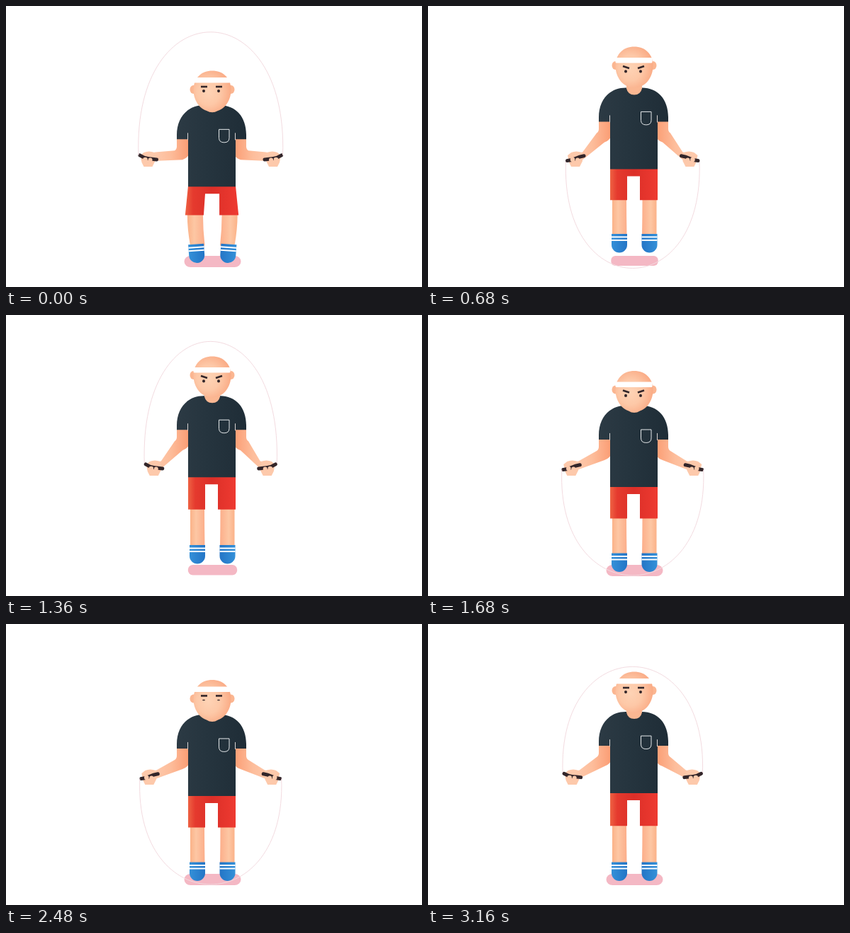
Animation of 587 by 397 pixels, one loop 3.2 s. Source, as an HTML page:

```html
<!DOCTYPE html>
<html lang="en">
<head>
<meta charset="utf-8">
<title>Skipping rope</title>
<style>
  html, body { margin: 0; width: 100%; height: 100%; overflow: hidden; background: #fff; }
  svg { display: block; }
</style>
</head>
<body>
<svg width="587" height="397" viewBox="0 0 587 397">
  <defs>
    <radialGradient id="face" cx=".4" cy=".52" r=".62">
      <stop offset="0" stop-color="#fed3b5"/><stop offset=".5" stop-color="#fdc8a7"/>
      <stop offset="1" stop-color="#faa983"/>
    </radialGradient>
    <linearGradient id="arm" gradientUnits="userSpaceOnUse" x1="200" y1="0" x2="258" y2="0">
      <stop offset="0" stop-color="#fecfb4"/><stop offset=".55" stop-color="#fdbd9b"/>
      <stop offset="1" stop-color="#fb9d74"/>
    </linearGradient>
    <linearGradient id="leg">
      <stop offset="0" stop-color="#fbb288"/><stop offset=".4" stop-color="#fdc7a4"/>
      <stop offset="1" stop-color="#fcae8a"/>
    </linearGradient>
    <linearGradient id="shirt">
      <stop offset="0" stop-color="#2c3a44"/><stop offset=".4" stop-color="#26353f"/>
      <stop offset="1" stop-color="#1f2d37"/>
    </linearGradient>
    <linearGradient id="shorts">
      <stop offset="0" stop-color="#ee6243"/><stop offset=".15" stop-color="#e53a2e"/>
      <stop offset=".5" stop-color="#dc2f28"/><stop offset="1" stop-color="#ee3a31"/>
    </linearGradient>
    <linearGradient id="sock">
      <stop offset="0" stop-color="#3490d8"/><stop offset="1" stop-color="#2475c6"/>
    </linearGradient>
  </defs>
  <g id="scene"></g>
</svg>
<script>
const LOOP = 3200, STEP = 40, TURN = Math.PI * 2;
const DARK = '#33262a', SKIN = '#fdc9ab', GROUND = 363;
const scene = document.getElementById('scene');

// One jump, ten evenly spaced poses
const HIP = [255, 253, 243, 235, 230, 228, 228, 230, 233, 238];
const CROWN = [91, 89, 79, 69, 60, 55, 54, 57, 60, 66];
const LIFT = [0, 0, 0, 3, 10, 15, 17, 15.5, 8, 0];

function sample(keys, p) {
  const i = Math.floor(p), u = p - i, n = keys.length;
  const [a, b, c, d] = [-1, 0, 1, 2].map(k => keys[(i + k + n) % n]);
  return b + u / 2 * (c - a + u * (2 * a - 5 * b + 4 * c - d + u * (3 * (b - c) + d - a)));
}
const clamp = x => Math.max(0, Math.min(1, x));
const smooth = (t, from, to) => { const x = clamp((t - from) / (to - from)); return x * x * (3 - 2 * x); };
const blinkAt = (t, mid) => clamp(1.5 - Math.abs(t - mid) / 70);
const line = (x1, y1, x2, y2, color, w) =>
  `<path d="M${x1} ${y1}L${x2} ${y2}" stroke="${color}" stroke-width="${w}" fill="none"/>`;

function shadow(lift) {
  const air = clamp(lift / 15), half = 40 - 7 * air, height = 16 - 2 * air;
  return `<rect x="${291.5 - half}" y="353" width="${half * 2}" height="${height}" rx="${9 - 3 * air}" fill="#f4b8c4"/>`;
}

function rope(x1, x2, y, swing) {
  const reach = swing * (swing > 0 ? 199 : 152) * 4 / 3, bulge = 8;
  return `<path d="M${x1} ${y}C${x1 - bulge} ${y - reach} ${x2 + bulge} ${y - reach} ${x2} ${y}" fill="none" stroke="#f3dbe0"/>`;
}

function leg(hip, foot, bend, mirrored) {
  const hem = hip + (foot - hip) * .36, top = foot - 26.5, b = bend;
  return `<g ${mirrored ? 'transform="matrix(-1 0 0 1 582.5 0)"' : ''}>
    <path d="M${260 - b} ${hem}Q${260 - b} ${(hem + top) / 2} 260 ${top + 2}H280.5Q${280 - b / 2} ${(hem + top) / 2} ${280 - b / 2} ${hem}Z" fill="url(#leg)"/>
    <g transform="rotate(${-b} 270 ${foot})">
      <path d="M259 ${top}H281V${foot - 11}A11 11 0 0 1 259 ${foot - 11}Z" fill="url(#sock)"/>
      ${line(259, top + 4.5, 281, top + 4.5, '#fff', 2)}${line(259, top + 9, 281, top + 9, '#fff', 2)}
    </g></g>`;
}

function shorts(hip, foot, bend) {
  const hem = hip + (foot - hip) * .372;
  return `<path d="M257 ${hip - 1}H324L${324 + bend} ${hem}H${299 + bend / 2}V${hip + 10}H281L${281 - bend / 2} ${hem}H${257 - bend}Z" fill="url(#shorts)"/>`;
}

function arm(hip, x, swing, mirrored) {
  const tilt = -4 * swing, y = 214.5;
  return `<g ${mirrored ? 'transform="matrix(-1 0 0 1 580 0)"' : ''}>
    <path d="M241 ${hip - 75}H258V${hip - 46}Q257 ${hip - 41} 249 ${hip - 38}L${x + 22} 219L${x + 18} 208L${x + 24} 206.5L238 ${hip - 51}Q241 ${hip - 53} 241 ${hip - 57}Z" fill="url(#arm)"/>
    <path d="M${x + 8} 207Q${x + 15} 204 ${x + 23} 207L${x + 24} 219L${x + 20} 227H${x + 8}L${x + 5} 221L${x + 3} 211Z" fill="${SKIN}"/>
    <path d="M${x + 2.5} ${y + tilt}Q${x + 8} ${y + tilt / 2 + 2} ${x + 14} ${y + 1}T${x + 26} ${y - tilt * .7}" fill="none" stroke="${DARK}" stroke-width="5" stroke-linecap="round"/>
    <circle cx="${x + 10}" cy="${y + 2.5}" r="3.3" fill="${SKIN}"/>
    <circle cx="${x + 17}" cy="${y + 3}" r="3" fill="${SKIN}"/>
  </g>`;
}

function shirt(hip) {
  return `<g transform="translate(0 ${hip})">
    <path d="M241-67V-73C241-99 257-115 279-115H302C324-115 339-99 339-73V-67H324V0H257V-67Z" fill="url(#shirt)"/>
    ${line(256.5, -76, 256.5, -66, '#d9d4d3', 1)}${line(323.5, -76, 323.5, -66, '#d9d4d3', 1)}
    <path d="M300.5-81H315V-69Q315-62.5 307.8-62.5T300.5-69Z" fill="none" stroke="#e6eaec"/>
    <path d="M280-119H302V-114Q300-105 291-105T280-114Z" fill="#fbb792"/>
  </g>`;
}

function head(crown, anger, blink) {
  const band = 9.5 + 6 * anger, brow = 22.5 + 6.5 * anger, eye = brow + 6, slant = 1.5 * anger;
  const open = 1 - blink;
  const eyes = open > .02
    ? [279, 300].map(x => `<ellipse cx="${x}" cy="${eye}" rx="2" ry="${2.1 * open}" fill="${DARK}"/>`).join('') : '';
  return `<g transform="translate(0 ${crown})">
    <ellipse cx="264.5" cy="26.5" rx="5" ry="6" fill="#fbb691"/>
    <ellipse cx="317.5" cy="26.5" rx="5" ry="6" fill="#fbb691"/>
    <path d="M264.5 27C264.5 10 276 0 291 0S317.5 10 317.5 27C317.5 44 306 58 291 58S264.5 44 264.5 27Z" fill="url(#face)"/>
    <rect x="264.5" y="${band}" width="52" height="7.5" rx="1.5" fill="#fff"/>
    ${line(275, brow - slant, 284, brow + slant, DARK, 2.6)}
    ${line(296, brow + slant, 305, brow - slant, DARK, 2.6)}
    ${eyes}
  </g>`;
}

function draw(t) {
  // Every second jump runs slightly ahead
  const f = t / STEP % 20;
  const p = f + .25 * Math.sin(Math.PI * (f - 3) / 20) ** 2;
  const hip = sample(HIP, p), lift = Math.max(0, sample(LIFT, p));
  const foot = GROUND - lift;
  const bend = Math.max(0, 116 - foot + hip) * .5;

  // The rope turns twice per jump
  const angle = (p + .35) / 5 * TURN, swing = Math.cos(angle), inFront = Math.sin(angle) > 0;
  const x = 186.5 + Math.max(0, 255 - hip) ** 2 / 80;
  const cord = rope(x + .5, 577 - x, 214.5 - 4 * swing, swing);

  const anger = smooth(t, 400, 600) - smooth(t, 1760, 1960);
  const blink = clamp(blinkAt(t, 1080) + blinkAt(t, 2540));

  scene.innerHTML = shadow(lift) + (inFront ? '' : cord)
    + leg(hip, foot, bend, false) + leg(hip, foot, bend, true) + shorts(hip, foot, bend)
    + arm(hip, x, swing, false) + arm(hip, x + 2.5, swing, true)
    + shirt(hip) + head(sample(CROWN, p), anger, blink) + (inFront ? cord : '');
}

const start = performance.now();
let shown = -1;
function tick() {
  const t = Math.floor((performance.now() - start) % LOOP / STEP) * STEP;
  if (t !== shown) draw(shown = t);
  requestAnimationFrame(tick);
}
tick();
</script>
</body>
</html>
```
